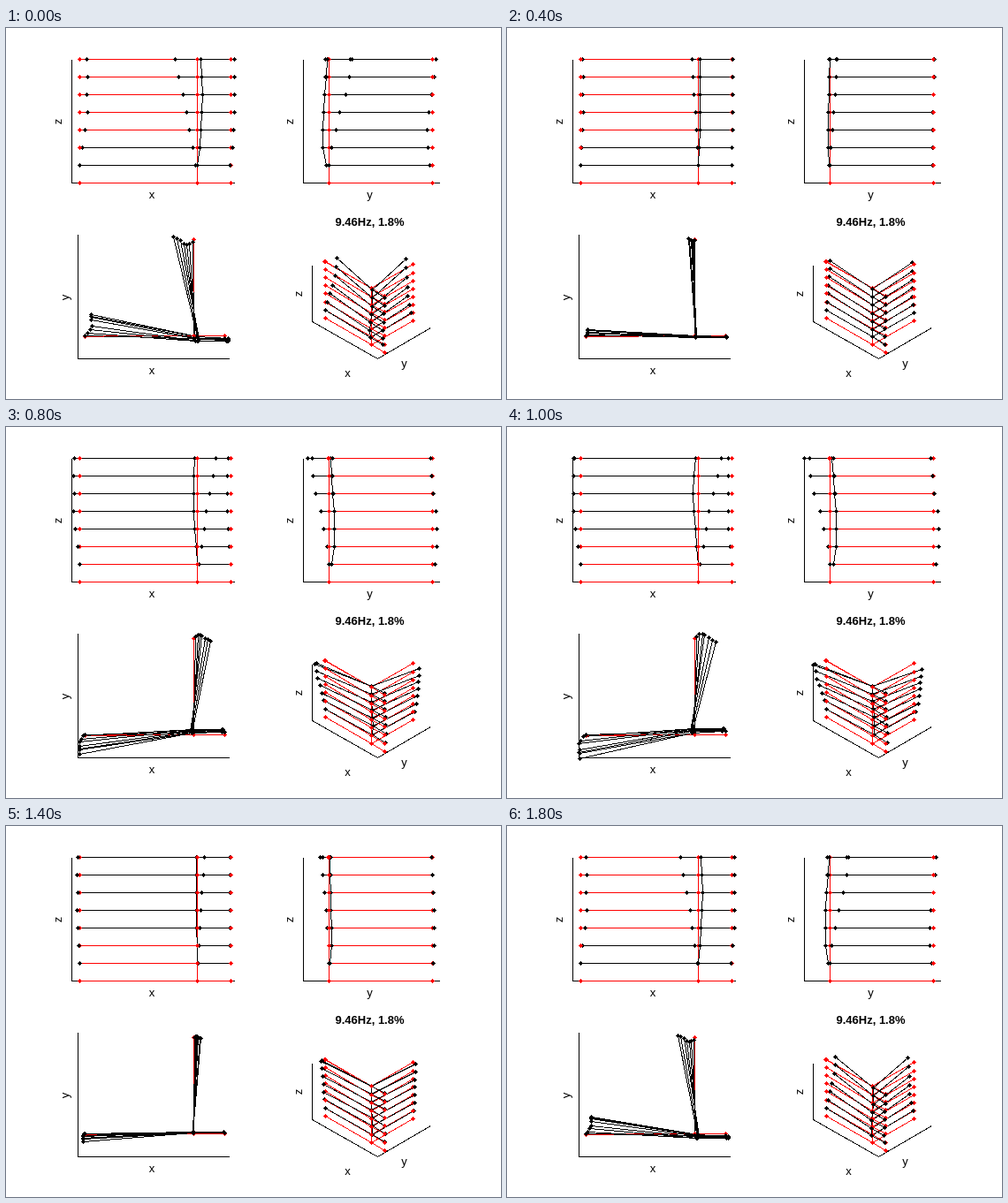
An HTML page that plays this animation: 560 px wide and 420 px high, repeating every 2000 ms.

```html
<!DOCTYPE html>
<html lang="en">
<head>
<meta charset="utf-8">
<title>Mode shape</title>
<style>
  html, body { margin: 0; width: 100%; height: 100%; overflow: hidden; background: #fff; }
  svg { display: block; width: 560px; height: 420px; }
  text { font: 13px "Liberation Sans", Arial, sans-serif; text-anchor: middle; fill: #000; }
  .title { font-weight: bold; }
  path { shape-rendering: crispEdges; }
  .line { fill: none; stroke-width: 1; }
</style>
</head>
<body>
<svg viewBox="0 0 560 420">
  <rect width="560" height="420" fill="#fff"/>
  <g transform="translate(.5 .5)">
    <path class="line" stroke="#000" d="M74 35V175H258M336 35V175H490M81 233V374H252M346 268V332L420 374L480 339"/>
    <g id="plots"></g>
  </g>
  <g id="labels"></g>
  <text class="title" x="411.500" y="224">9.46Hz, 1.8%</text>
</svg>
<script>
const STEP = 200, STEPS = 10, TOP = 7;
const RED = '#f00', BLACK = '#000';
const DIAMOND = 'h1v1h1v1h1v1h-1v1h-1v1h-1v-1h-1v-1h-1v-1h1v-1h1z';
const plots = document.getElementById('plots');

// Rest position and peak displacement of each wall end, storeys 1 to 7
const ends = {
  left:   { x: 83, y: 365.4,
            dx: [0, 3, 6, 8.5, 8, 8.5, 8],
            dy: [0, 2.5, 7.5, 11.5, 18.5, 22.5, 23.5] },
  corner: { x: 216.4, y: 365.4,
            dx: [0, 2.2, 3.8, 5, 6, 5, 3.8],
            dy: [-3.5, -7, -7, -6.5, -5, -3.5, -2] },
  right:  { x: 253.8, y: 365.4,
            dx: [-.5, 2, 3.4, 4.2, 4.2, 4.2, 4],
            dy: [-3.5, -7, -7, -6.5, -5.5, -4.5, -4] },
  far:    { x: 216.4, y: 482.4,
            dx: [-2, -5.5, -9, -12, -16.5, -21.5, -25.5],
            dy: [-3, -5.5, -6, -4.5, -1, 1.5, 3.5] }
};
const sensor = { x: 83, y: 363.5, dx: 7.5, dy: 27.4 };

// at: projection; near: closeness of a node; hidden: wall passes behind its rest line
const views = [
  { at: (x, y, n) => [x, 175 - 20 * n], near: (x, y) => -y,
    hidden: (wall, dx, dy) => wall === 'left' && dy > 0 },
  { at: (x, y, n) => [y, 175 - 20 * n], near: x => x,
    hidden: (wall, dx) => wall === 'far' && dx > 0 },
  { at: (x, y) => [89 + (x - 83) * .925, 347.5 - (y - 365.5) * .925], near: () => 0,
    hidden: () => false },
  { at: (x, y, n) => [361 + (x - 83) * .392 + (y - 365.5) * .402,
                      264 + 9.1 * (TOP - n) + (x - 83) * .228 - (y - 365.5) * .231],
    near: (x, y) => x - y, hidden: () => false }
];

function frame(amp, first) {
  const nodes = [], links = [], spine = [];
  const join = (wall, ...pts) => links.push({ wall, pts });
  for (let n = first; n <= TOP; n++) {
    const p = {};
    for (const key in ends) {
      const e = ends[key], i = n - 1;
      p[key] = n ? [e.x + amp * e.dx[i], e.y + amp * e.dy[i], n] : [e.x, e.y, 0];
      nodes.push(p[key]);
    }
    for (const wall of ['left', 'right', 'far']) join(wall, p[wall], p.corner);
    spine.push(p.corner);
    if (n === TOP) {
      const s = [sensor.x + amp * sensor.dx, sensor.y + amp * sensor.dy, n];
      nodes.push(s);
      join('left', s, p.corner);
    }
  }
  join('spine', ...spine);
  return { nodes, links };
}

const rest = frame(0, 0), restUpper = frame(0, 1);

function lines(view, links, color) {
  const d = links.map(l => 'M' + l.pts.map(p => view.at(...p).map(Math.round).join(' ')).join('L')).join('');
  return `<path class="line" d="${d}" stroke="${color}"/>`;
}

function dots(view, nodes, color) {
  const d = nodes.map(p => {
    const [x, y] = view.at(...p).map(Math.round);
    return `M${x - .5} ${y - 2.5}${DIAMOND}`;
  }).join('');
  return `<path d="${d}" fill="${color}"/>`;
}

// Total displacement of a link along one axis
const shift = (a, b, axis) => a.pts.reduce((sum, p, i) => sum + p[axis] - b.pts[i][axis], 0);

function split(list, test) {
  const yes = [], no = [];
  list.forEach((item, i) => (test(item, i) ? yes : no).push(item));
  return [yes, no];
}

function draw(step) {
  const live = frame(Math.cos(2 * Math.PI * step / STEPS), 1);
  plots.innerHTML = views.map(v => {
    const [under, over] = split(live.links, (l, i) => {
      const r = restUpper.links[i];
      return v.hidden(l.wall, shift(l, r, 0), shift(l, r, 1));
    });
    const [back, front] = split(live.nodes, (p, i) =>
      v.near(...p) < v.near(...restUpper.nodes[i]));
    return lines(v, under, BLACK) + lines(v, rest.links, RED) + lines(v, over, BLACK) +
      dots(v, back, BLACK) + dots(v, rest.nodes, RED) + dots(v, front, BLACK);
  }).join('');
}

const label = (s, x, y, turn) => turn
  ? `<text transform="translate(${x} ${y}) rotate(-90)">${s}</text>`
  : `<text x="${x}" y="${y}">${s}</text>`;
document.getElementById('labels').innerHTML =
  label('x', 165, 193) + label('z', 63, 106, 1) +
  label('y', 411.5, 193) + label('z', 325, 106, 1) +
  label('x', 165, 392) + label('y', 71, 305, 1) +
  label('x', 386.5, 395) + label('y', 450.5, 384) + label('z', 335, 301, 1);

let shown = -1;
function tick() {
  const step = Math.floor(performance.now() / STEP) % STEPS;
  if (step !== shown) draw(shown = step);
  requestAnimationFrame(tick);
}
tick();
</script>
</body>
</html>
```
